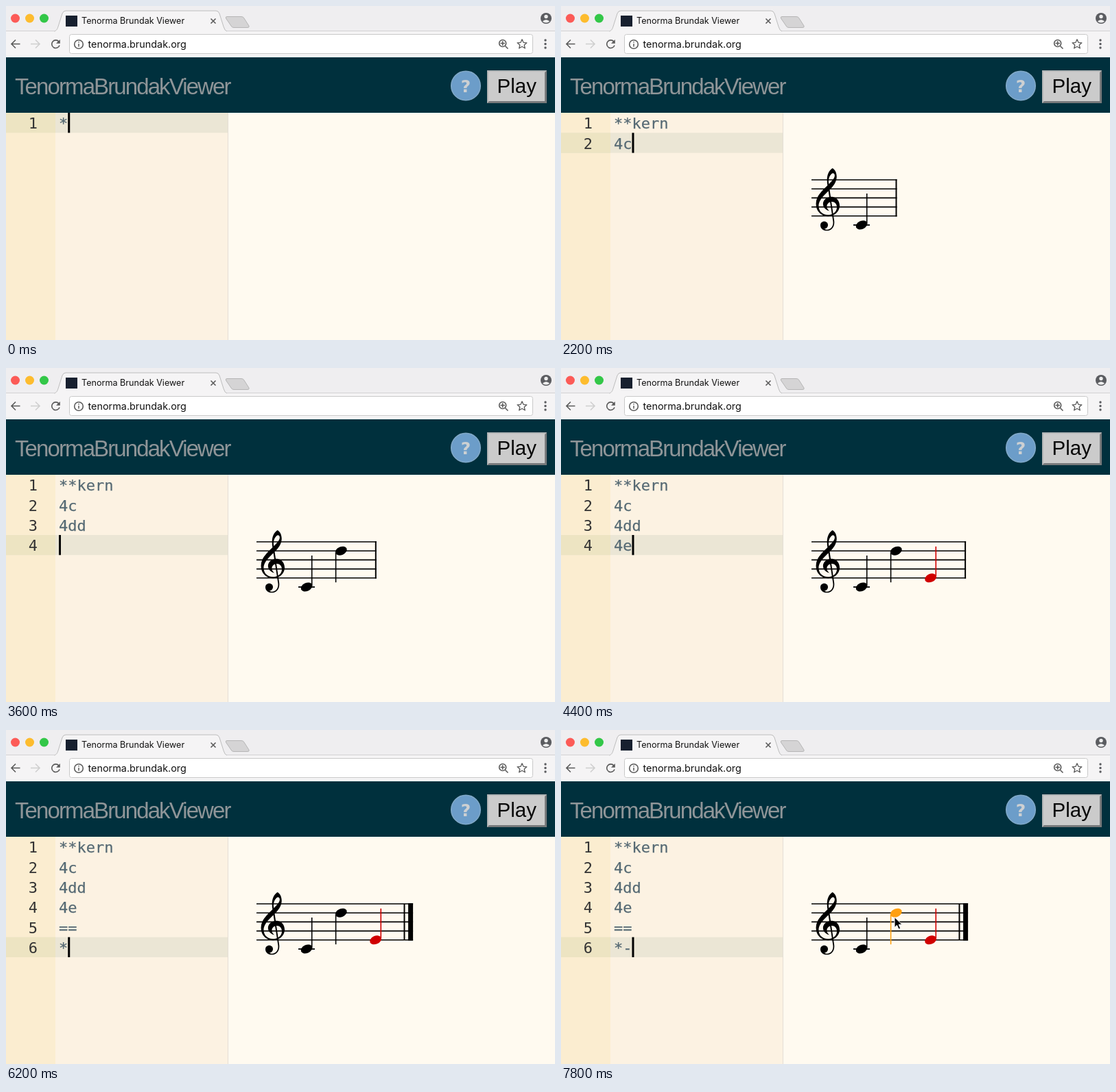
An HTML page for the animation above (8000 ms loop, 800 by 488 pixels).

```html
<!DOCTYPE html>
<html lang="en">
<head>
<meta charset="utf-8">
<title>Notation editor</title>
<style>
  html, body { margin: 0; width: 100%; height: 100%; overflow: hidden; background: #fffaf0; }
  svg { display: block; width: 100%; height: 100%; }
  text { white-space: pre; }
  .ui { font-family: Inter, Roboto, sans-serif; fill: #111; }
  .sans { font-family: "Liberation Sans", Arial, sans-serif; }
  .code { font: 22px "DejaVu Sans Mono", "Noto Sans Mono", monospace; }
  .icon { fill: none; stroke: #5a5a5a; stroke-width: 1.6; }
</style>
</head>
<body>
<svg viewBox="0 0 800 488">
  <!-- browser window -->
  <rect width="800" height="76" fill="#f5f4f5"/>
  <rect width="800" height="37" fill="#efeef0"/>
  <path d="M0 36.5H70M322 36.5H800" stroke="#d3d2d4"/>
  <circle cx="13.5" cy="18" r="6.5" fill="#fc5b57"/>
  <circle cx="34.5" cy="18" r="6.5" fill="#fdbc2e"/>
  <circle cx="55.5" cy="18" r="6.5" fill="#33c748"/>
  <path d="M70 37C74 36 75 33 76 30L82 11Q83.500 7 87 7H306Q309.500 7 311 11L317 30Q318.500 36 322 37" fill="#f5f4f5" stroke="#bdbdbd"/>
  <path d="M322 15.500H343Q346 15.500 347 18L354 29Q355 31.500 352 31.500H332Q329 31.500 328 29L320.500 18Q319.500 15.500 322 15.500Z" fill="#d5d4d5" stroke="#b6b6b6"/>
  <rect x="87" y="14" width="17" height="16" fill="#17202f"/>
  <text class="ui" x="110" y="26" font-size="12.6">Tenorma Brundak Viewer</text>
  <path class="icon" d="M298.500 18.500l7 7m0-7l-7 7" stroke-width="1.3"/>
  <g fill="#5b5c60">
    <circle cx="787" cy="18" r="8"/>
    <circle cx="787" cy="15.500" r="2.700" fill="#eee"/>
    <path d="M781.800 22.500Q787 17.500 792.200 22.500Q787 26.500 781.800 22.500Z" fill="#eee"/>
    <circle cx="786" cy="50" r="1.700"/><circle cx="786" cy="55.500" r="1.700"/><circle cx="786" cy="61" r="1.700"/>
  </g>
  <path class="icon" d="M20.500 55.500H8m6-6l-6 6l6 6"/>
  <path class="icon" d="M36 55.500H49m-6-6l6 6l-6 6" style="stroke:#cfcfcf"/>
  <path class="icon" d="M77 52A5.800 5.800 0 1 0 78 57.500"/>
  <path d="M78.800 49V54.800H73Z" fill="#5a5a5a"/>
  <rect x="92.500" y="41.500" width="675" height="28" rx="3" fill="#fff" stroke="#c9c9c9"/>
  <circle class="icon" cx="106" cy="56" r="6.300" stroke-width="1.300"/>
  <path d="M106 55V59.500M106 52V53.600" stroke="#5a5a5a" stroke-width="1.500"/>
  <text class="ui" x="119.500" y="61" font-size="14.4">tenorma.brundak.org</text>
  <path class="icon" d="M727.500 58.500L731.500 62.500M720.500 54.500H727M723.700 51.200V57.800"/>
  <circle class="icon" cx="723.700" cy="54.500" r="5"/>
  <path class="icon" stroke-linejoin="round" d="M752 48.800L754 53.300L758.900 53.800L755.200 57L756.300 61.800L752 59.300L747.700 61.800L748.800 57L745.100 53.800L750 53.300Z" style="stroke-width:1.300"/>

  <!-- page header -->
  <rect y="75" width="800" height="81" fill="#00303d"/>
  <text class="sans" x="13" y="128.500" font-size="33" letter-spacing="-1.900" fill="#8f9598">TenormaBrundakViewer</text>
  <circle cx="670" cy="116.500" r="21.300" fill="#6c9dc9" stroke="#82a9c8" stroke-width="1.500"/>
  <text x="670" y="126" font-family="DejaVu Sans, sans-serif" font-size="25" font-weight="bold" text-anchor="middle" fill="#cdd0d2">?</text>
  <rect x="701" y="94" width="87" height="48" fill="#cbcbcb"/>
  <path d="M701 142V94H788L786 96H703V140Z" fill="#b4b6b7"/>
  <path d="M701 142H788V94L785 97V139H704Z" fill="#77797b"/>
  <text class="sans" x="715.500" y="127" font-size="29.500" fill="#080808">Play</text>

  <!-- editor -->
  <rect y="156" width="800" height="332" fill="#fffaf0"/>
  <rect y="156" width="323" height="332" fill="#fcf2e2"/>
  <rect y="156" width="72" height="332" fill="#fbedd0"/>
  <g id="row">
    <rect width="323" height="29.300" fill="#ebe6d5"/>
    <rect width="72" height="29.300" fill="#ede4c2"/>
  </g>
  <path d="M323.500 156V488" stroke="#e4dfd6"/>
  <g id="lines" class="code"></g>
  <rect id="caret" width="3" height="29.300" fill="#000"/>
  <g id="score"></g>
  <path id="pointer" d="M0 0V15L3.500 11.800L6 17.500L8.700 16.300L6.200 10.800H11Z" fill="#000" stroke="#fff"/>
</svg>
<script>
const $ = id => document.getElementById(id);
const LOOP = 8000, STEP = 200, ROW = 29.33, CHAR = 13.24;
const GAP = 13.2, TOP = 254, LEFT = 365;

// keystrokes: [time, key]
const keys = [
  [0, '*'], [200, '*'], [400, 'k'], [600, 'e'], [800, 'r'], [1000, 'n'], [1400, '\n'],
  [1600, '4'], [2000, 'c'], [2400, '\n'],
  [2600, '4'], [3000, 'd'], [3200, 'd'], [3600, '\n'],
  [3800, '4'], [4200, 'e'], [4800, '\n'],
  [5200, '='], [5400, '='], [5800, '\n'], [6200, '*'], [6400, '-']
];

// pointer stops: [time, x, y]
const stops = [[6600, 400, 292], [7000, 437, 318], [7200, 437, 318], [7800, 486, 273.5]];

const CLEF = 'M395.5 237C400 239 402.5 246 401.5 252C400 262 391 269 385 275' +
  'C379 281 375 287 375.5 293C376 301 382 305.2 389.5 305.2C397 305.2 402 300 402 294' +
  'C402 289 398.5 285.8 394.5 286C387.5 286.5 384.5 294 391 299.5' +
  'C383 297.5 380.5 290.5 382.5 285.8C385 280.5 390 278.6 395 278.8' +
  'C402 279.3 406.3 285.5 406 292.5C405.6 301 398 307.3 389 307.2' +
  'C378 307 371.3 298.5 371.6 288.5C372 277 381 269.5 387.5 263' +
  'C394 256.5 399.5 251.5 398.8 247C398.3 243.8 396 243.6 394.5 245' +
  'C391 248 389.5 253 390 258L398 313C399.5 322 394.5 328.3 387.5 328.3' +
  'C381.5 328.3 378 324.5 378 320.5C378 317 380.5 314.8 383.5 314.8' +
  'C386.8 314.8 389 317.2 389 320C389 323 386.5 325.5 384 325.3' +
  'C385 326.5 386.5 326.9 388 326.8C393.5 326.5 397.5 321.5 396.3 314' +
  'L388.3 262C386.5 250 388.5 242 395.5 237Z';

const linesAt = t => keys.filter(k => k[0] <= t).map(k => k[1]).join('').split('\n');
const line = (x1, y1, x2, y2, w, color = '#000') =>
  `<path d="M${x1} ${y1}L${x2} ${y2}" stroke="${color}" stroke-width="${w}"/>`;

function note(name, i, color) {
  const x = 438 + 50.3 * i;
  const y = 320 - GAP / 2 * ('cdefgab'.indexOf(name[0]) + 7 * (name.length - 1));
  const dir = y > TOP + 2 * GAP ? 1 : -1;
  const ledger = y > 319 ? line(426, y, 450, y, 1.8) : '';
  return ledger +
    line(x + 7.7 * dir, y - 2 * dir, x + 7.7 * dir, y - 46 * dir, 1.6, color) +
    `<ellipse rx="8.8" ry="6" fill="${color}" transform="translate(${x} ${y}) rotate(-24)"/>`;
}

function score(lines, t) {
  const rows = lines.filter(s => s[0] === '4');
  if (!rows.length) return '';
  const final = lines.includes('==');
  const bar = 488.5 + 50.3 * (rows.length - 1);
  const right = final ? bar + 4 : bar + 1;
  const bottom = TOP + 4 * GAP;
  let out = '';
  for (let i = 0; i < 5; i++) out += line(LEFT, TOP + i * GAP, right, TOP + i * GAP, 1.6);
  out += final
    ? line(bar - 8.6, TOP, bar - 8.6, bottom, 2) + line(bar + 0.5, TOP - 0.8, bar + 0.5, bottom + 0.8, 7)
    : line(bar, TOP - 0.8, bar, bottom + 0.8, 2);
  out += `<path d="${CLEF}"/>`;
  const hover = t >= 7600 ? 1 : t >= 7000 && t < 7400 ? 0 : -1;
  rows.forEach((s, i) => {
    const name = s.slice(1);
    if (name) out += note(name, i, i === hover ? '#ffa010' : name === 'e' ? '#d00000' : '#000');
  });
  return out;
}

function pointerAt(t) {
  const n = stops.findIndex(s => s[0] > t);
  if (n < 0) return stops[stops.length - 1].slice(1);
  const [a, b] = [stops[n - 1], stops[n]];
  const p = (t - a[0]) / (b[0] - a[0]);
  return [1, 2].map(k => a[k] + (b[k] - a[k]) * p);
}

function render(t) {
  const lines = linesAt(t), last = lines.length - 1, y = 156 + last * ROW;
  $('lines').innerHTML = lines.map((s, i) => {
    const base = 179.4 + i * ROW;
    return `<text x="46" y="${base}" text-anchor="end" fill="#333">${i + 1}</text>` +
      `<text x="77" y="${base}" fill="#566a74" stroke="#566a74" stroke-width=".25">${s}</text>`;
  }).join('');
  $('row').setAttribute('transform', `translate(0 ${y})`);
  $('caret').setAttribute('x', 77 + lines[last].length * CHAR);
  $('caret').setAttribute('y', y);
  $('score').innerHTML = score(linesAt(t - STEP), t);
  const shown = t >= stops[0][0];
  $('pointer').style.display = shown ? '' : 'none';
  if (shown) $('pointer').setAttribute('transform', `translate(${pointerAt(t)})`);
}

const start = performance.now();
let shownAt = -1;
function tick() {
  const t = Math.floor((performance.now() - start) % LOOP / STEP) * STEP;
  if (t !== shownAt) render(shownAt = t);
  requestAnimationFrame(tick);
}
tick();
</script>
</body>
</html>
```
